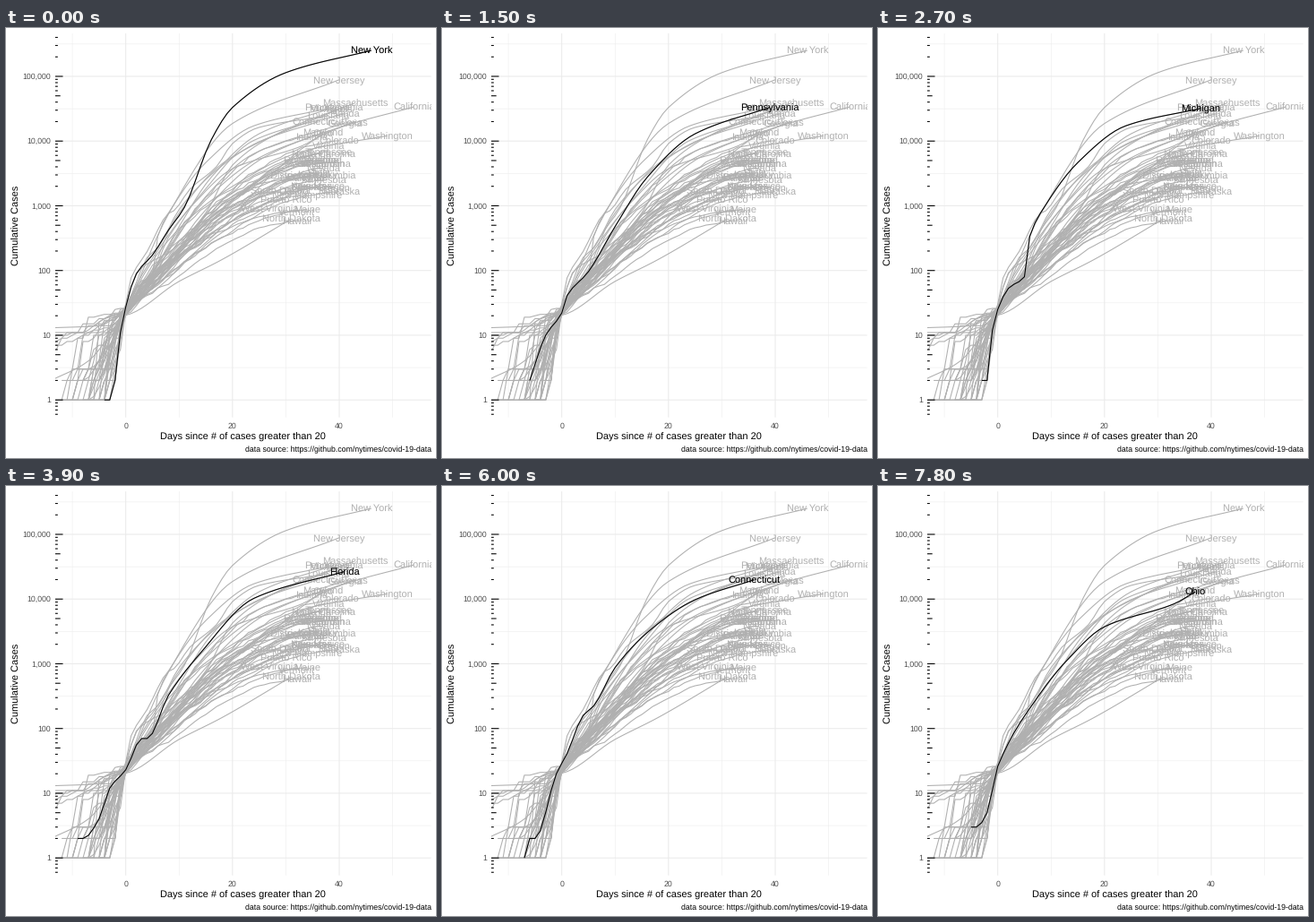
Write a matplotlib script that moves like this. It is 480 by 480 pixels and loops after 8 s.

```python
import numpy as np
import matplotlib.pyplot as plt
from matplotlib.animation import FuncAnimation

SIZE, DPI = 480, 80
PT = 72 / DPI                     # points per pixel
LEFT, RIGHT, TOP, BOTTOM = 55, 474.5, 5.5, 434.7
X_MIN, X_MAX, Y_MIN, Y_MAX = -13.2, 57.2, -0.27, 5.671
X_PX = (X_MAX - X_MIN) / (RIGHT - LEFT)      # data units per pixel
Y_PX = (Y_MAX - Y_MIN) / (BOTTOM - TOP)
GREY, GRID, AXIS_TEXT = "#B0B0B0", "#EBEBEB", "#4D4D4D"
LINE = 1.07 * PT

plt.rcParams.update({"font.family": "Liberation Sans", "text.hinting": "none",
                     "path.snap": False, "lines.solid_capstyle": "butt"})
rng = np.random.default_rng(20)
curves = []                       # (name, days, log10 of cases)


def monotone(t, x, y):
    """Smooth rise through the points that never overshoots."""
    h, slope = np.diff(x), np.diff(y) / np.diff(x)
    a, b = slope[:-1], slope[1:]
    inner = 2 * a * b / np.maximum(a + b, 1e-9)
    m = np.concatenate([slope[:1], inner, slope[-1:]])
    i = np.clip(np.searchsorted(x, t, side="right") - 1, 0, len(h) - 1)
    u = (t - x[i]) / h[i]
    ease = u * u * (3 - 2 * u)
    bend = u * (1 - u) * h[i] * ((1 - u) * m[i] - u * m[i + 1])
    return y[i] + (y[i + 1] - y[i]) * ease + bend


def track(name, *points):
    x, cases = np.array(points).T
    days = np.arange(x[0], x[-1] + 1)
    curves.append((name, days, monotone(days, x, np.log10(cases))))


def ramp(steps):
    return np.cumsum(steps) / np.sum(steps)


def grow(name, last, cases, first, initial):
    """Uneven integer start up to day 0, then growth that levels off."""
    start = rng.integers(20, 27)
    u = np.append(0, ramp(rng.gamma(0.7, size=-first)))
    early = np.log10(np.round(initial * (start / initial) ** u))
    t = np.linspace(0, 1, last + 1)
    steps = np.diff(1 - (1 - t) ** rng.uniform(1.5, 2.1))
    rise = ramp(steps * rng.uniform(0.45, 1.55, last))
    late = early[-1] + (np.log10(cases) - early[-1]) * rise
    curves.append((name, np.arange(first, last + 1), np.append(early, late)))


# Highlighted one after another, in this order: (day, cases) key points
track("New York", (-4, 1), (-3, 1), (-2, 2), (-1, 11), (2, 89), (5, 173),
      (8, 421), (11, 950), (16, 10356), (20, 33066), (30, 114174), (46, 251720))
track("New Jersey", (-7, 1), (-4, 4), (0, 23), (8, 742), (20, 18696),
      (40, 88722))
track("Massachusetts", (-14, 1), (-7, 1), (0, 28), (2, 92), (9, 218),
      (15, 777), (20, 4257), (28, 12500), (43, 39000))
track("Pennsylvania", (-6, 2), (-3, 10), (0, 22), (1, 41), (5, 96), (10, 479),
      (16, 2751), (25, 12980), (39, 33232))
track("California", (-14, 13), (-5, 14), (0, 26), (17, 381), (29, 4060),
      (38, 13796), (54, 33862))
track("Michigan", (-3, 2), (-2, 2), (-1, 12), (0, 25), (2, 53), (5, 80),
      (6, 336), (9, 1035), (15, 4658), (24, 17221), (38, 32000))
track("Illinois", (-14, 2), (-7, 4), (0, 25), (5, 105), (9, 583), (19, 5070),
      (40, 31508))
track("Florida", (-9, 2), (-8, 2), (-5, 4), (-3, 12), (0, 23), (3, 70),
      (4, 70), (8, 326), (14, 1467), (24, 10260), (41, 26652))
track("Louisiana", (-4, 1), (-2, 13), (-1, 14), (1, 77), (4, 196), (8, 763),
      (9, 837), (12, 1795), (17, 4025), (20, 9150), (25, 16284), (38, 24523))
track("Texas", (-14, 11), (-5, 11), (0, 22), (7, 83), (13, 555), (26, 5667),
      (43, 20088))
track("Connecticut", (-7, 1), (-6, 2), (-5, 2), (-1, 20), (1, 41), (4, 159),
      (6, 223), (10, 875), (17, 3557), (25, 9784), (36, 19815))
track("Georgia", (-8, 2), (-5, 2), (-2, 12), (3, 42), (8, 197), (15, 1387),
      (24, 6383), (41, 18947))
track("Maryland", (-9, 3), (-7, 3), (0, 26), (9, 290), (15, 1239), (25, 5529),
      (37, 13684))
track("Ohio", (-5, 3), (-4, 3), (-2, 5), (0, 26), (8, 351), (13, 1137),
      (20, 3739), (33, 8414), (37, 12919))

# Always grey
track("Washington", (-12, 1), (-3, 1), (0, 23), (10, 444), (20, 1997),
      (33, 6900), (49, 12085))
track("North Dakota", (-3, 20), (-1, 20), (10, 68), (18, 147), (31, 627))
OTHERS = [                        # name, last day, final cases
    ("Indiana", 35, 11688), ("Colorado", 40, 10112), ("Virginia", 38, 8542),
    ("Tennessee", 38, 6914), ("North Carolina", 37, 6400),
    ("Missouri", 35, 5941), ("Rhode Island", 35, 5090),
    ("Alabama", 36, 5025), ("Arizona", 37, 5064), ("Wisconsin", 37, 4499),
    ("Mississippi", 34, 4512), ("South Carolina", 36, 4439),
    ("Nevada", 37, 3830), ("Utah", 36, 3213), ("Kentucky", 36, 3050),
    ("District of Columbia", 35, 2927), ("Iowa", 36, 3159),
    ("Oklahoma", 33, 2680), ("Delaware", 34, 2745), ("Minnesota", 37, 2470),
    ("Arkansas", 35, 1973), ("Kansas", 34, 2025), ("New Mexico", 36, 1971),
    ("Oregon", 39, 1956), ("Idaho", 32, 1672), ("Nebraska", 40, 1648),
    ("South Dakota", 29, 1685), ("New Hampshire", 34, 1447),
    ("Puerto Rico", 30, 1252), ("West Virginia", 27, 908),
    ("Maine", 34, 875), ("Vermont", 32, 816), ("Hawaii", 32, 584),
]
for i, (name, last, cases) in enumerate(OTHERS):
    if i % 8 == 1:                # a few were slow starters
        grow(name, last, cases, -15, 5 + i // 8)
    else:
        grow(name, last, cases, -int(rng.integers(4, 13)), 1 + (i % 6 == 0))

fig = plt.figure(figsize=(SIZE / DPI, SIZE / DPI), dpi=DPI, facecolor="white")
ax = fig.add_axes([LEFT / SIZE, 1 - BOTTOM / SIZE,
                   (RIGHT - LEFT) / SIZE, (BOTTOM - TOP) / SIZE])
ax.set(xlim=(X_MIN, X_MAX), ylim=(Y_MIN, Y_MAX))
ax.axis("off")


def page_text(x, y, text, size, color="black", **kw):
    fig.text(x / SIZE, 1 - y / SIZE, text, fontsize=size * PT, color=color,
             va="baseline", **kw)


def draw_curve(color, zorder):
    line, = ax.plot([], [], color=color, lw=LINE, solid_joinstyle="round",
                    zorder=zorder)
    label = ax.text(0, 0, "", fontsize=11 * PT, color=color, ha="center",
                    va="baseline", zorder=zorder + 1, clip_on=True)
    label.set_clip_box(ax.bbox)
    return line, label


def show(artists, curve):
    line, label = artists
    name, days, logs = curve
    line.set_data(days, logs)
    label.set_text(name)
    label.set_position((days[-1], logs[-1] - 4.2 * Y_PX))


for x in range(-10, 51, 10):
    ax.axvline(x, color=GRID, lw=LINE / 2 if x % 20 else LINE, zorder=0)
for half in range(12):
    ax.axhline(half / 2, color=GRID, lw=LINE / 2 if half % 2 else LINE, zorder=0)

for power in range(-1, 6):
    for digit in range(1, 10):
        y = power + np.log10(digit)
        if Y_MIN < y < Y_MAX:
            length = {1: 8.5, 5: 5.67}.get(digit, 2.83)
            ax.plot([X_MIN, X_MIN + length * X_PX], [y, y], color="black",
                    lw=LINE, zorder=3)

for power in range(6):
    y = BOTTOM - (power - Y_MIN) / Y_PX
    page_text(50.3, y + 3.1, f"{10 ** power:,}", 8.8, AXIS_TEXT, ha="right")
for day in (0, 20, 40):
    page_text(LEFT + (day - X_MIN) / X_PX, 446.9, str(day), 8.8, AXIS_TEXT,
              ha="center")
page_text(264.7, 459.4, "Days since # of cases greater than 20", 11,
          ha="center")
page_text(14.4, 220, "Cumulative Cases", 11, ha="center", rotation=90,
          rotation_mode="anchor")
page_text(RIGHT, 472.7, "data source: https://github.com/nytimes/covid-19-data",
          8.8, ha="right")

for curve in curves:
    show(draw_curve(GREY, 2), curve)
front = draw_curve("black", 5)


def update(frame):
    # Each state stays for two 300 ms steps; the loop opens on a second step
    show(front, curves[(frame // 3 + 1) // 2])
    return front


anim = FuncAnimation(fig, update, frames=80, interval=100, repeat=True,
                     repeat_delay=0, blit=False)
plt.show()
```
